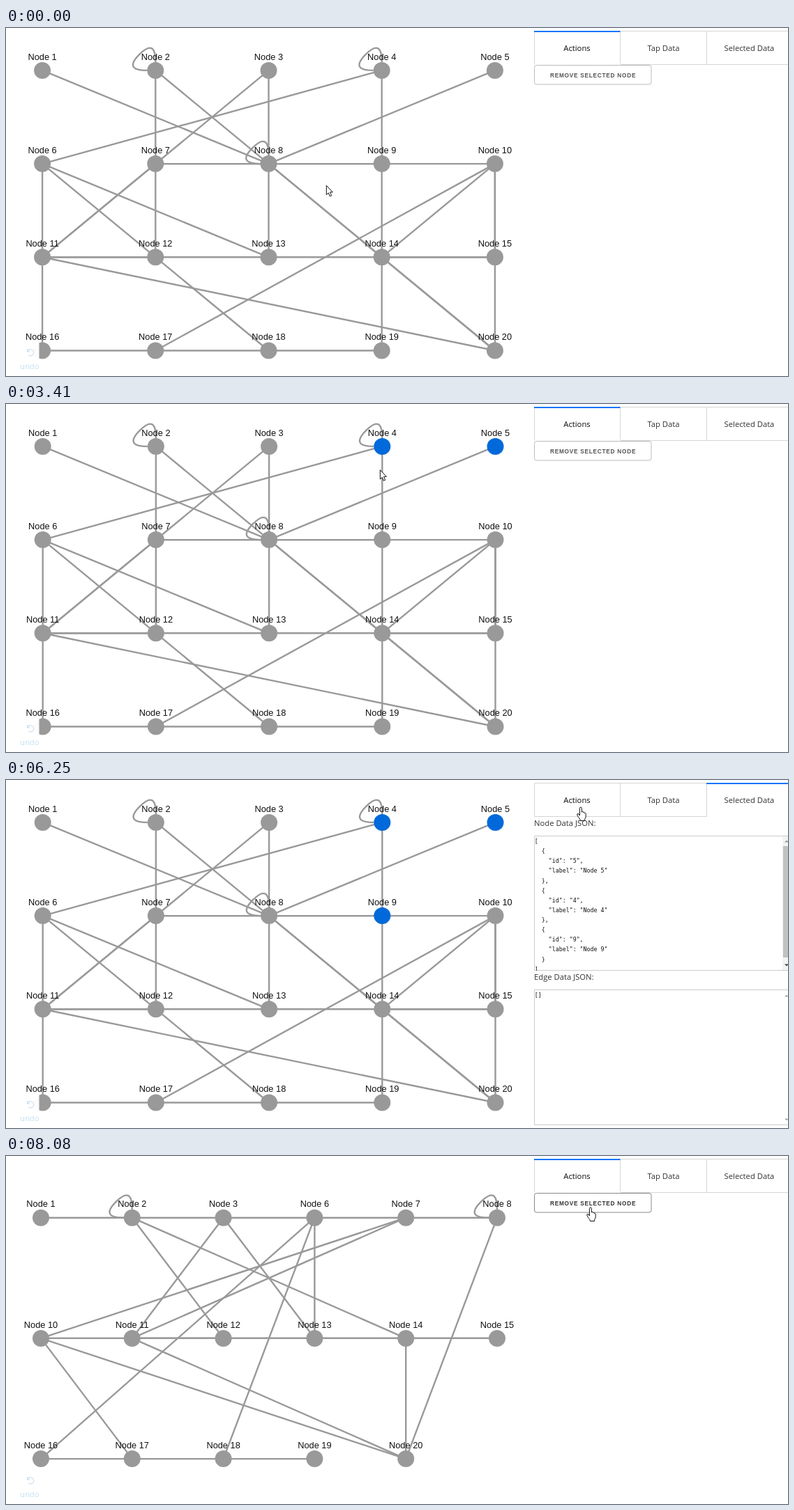
Recreate the animation shown at these times as an HTML page. Size 1121 by 500 pixels, loop 9110 ms.

```html
<!DOCTYPE html>
<html lang="en">
<head>
<meta charset="utf-8">
<title>Node graph</title>
<style>
html, body { margin: 0; width: 100%; height: 100%; overflow: hidden; background: #fff; }
svg { display: block; width: 1121px; height: 500px; }
.edge { fill: none; stroke: #999; stroke-width: 2.4; }
.label { font: 12.8px "Liberation Sans", Arial, sans-serif; text-anchor: middle; fill: #111; }
.ui { font: 11.25px "Open Sans", sans-serif; fill: #333; }
.mid { text-anchor: middle; }
.code { font: 8.3px "DejaVu Sans Mono", monospace; fill: #111; white-space: pre; }
.rule { fill: none; stroke: #d6d6d6; }
.button { font: bold 8.25px "Liberation Sans", Arial, sans-serif; letter-spacing: .75px; }
.cursor { fill: #fff; stroke: #111; stroke-width: 1; stroke-linejoin: round; }
</style>
</head>
<body>
<svg id="stage" viewBox="0 0 1121 500"></svg>
<script>
const LOOP = 9110;
const stage = document.getElementById('stage');

function add(parent, tag, attrs = {}, text) {
  const el = document.createElementNS('http://www.w3.org/2000/svg', tag);
  for (const key in attrs) el.setAttribute(key, attrs[key]);
  if (text !== undefined) el.textContent = text;
  parent.appendChild(el);
  return el;
}
const show = (el, on) => el.setAttribute('visibility', on ? 'inherit' : 'hidden');

const EDGES = ('1-8 2-12 2-14 3-11 3-13 4-6 4-19 5-8 6-13 6-16 6-18 7-9 7-10 7-11 8-20 ' +
  '10-14 10-15 10-17 10-20 11-12 11-15 11-20 14-15 14-20 16-19 2-2 4-4 8-8')
  .split(' ').map(pair => pair.split('-').map(Number));
const REMOVED = [4, 5, 9];
const ALL = Array.from({ length: 20 }, (_, i) => i + 1);
const KEPT = ALL.filter(id => !REMOVED.includes(id));

function edgePath([x, y], [u, v], isLoop) {
  if (!isLoop) return `M${x} ${y}L${u} ${v}`;
  const d = 46;
  return `M${x} ${y - 12}Q${x} ${y - d} ${x - d / 2} ${y - d / 2}Q${x - d} ${y} ${x - 12} ${y}`;
}

// Lays the given nodes out on a grid
function buildGraph(ids, cols, x0, y0, dx, dy) {
  const root = add(stage, 'g'), pos = {}, nodes = {}, doomed = [];
  ids.forEach((id, i) => pos[id] = [x0 + dx * (i % cols), y0 + dy * Math.floor(i / cols)]);
  for (const [a, b] of EDGES) {
    if (!pos[a] || !pos[b]) continue;
    const el = add(root, 'path', { class: 'edge', d: edgePath(pos[a], pos[b], a === b) });
    if (REMOVED.includes(a) || REMOVED.includes(b)) doomed.push(el);
  }
  for (const id of ids) {
    const [x, y] = pos[id];
    const g = add(root, 'g');
    nodes[id] = add(g, 'circle', { cx: x, cy: y, r: 12, fill: '#999' });
    add(g, 'text', { class: 'label', x, y: y - 15.4 }, 'Node ' + id);
    if (REMOVED.includes(id)) doomed.push(g);
  }
  return { root, pos, nodes, doomed };
}

const before = buildGraph(ALL, 5, 52.1, 60.9, 162.2, 134.2);
const after = buildGraph(KEPT, 6, 50, 88.7, 130.8, 173.2);
const press = add(before.root, 'rect', { width: 40.5, height: 40.5, rx: 4, fill: '#000', opacity: .25 });

// Undo control
add(stage, 'rect', { x: 20, y: 453, width: 27.5, height: 44, fill: '#fff', opacity: .97 });
add(stage, 'path', {
  d: 'M30.5 461v4h4M30.8 464.6A4.7 4.7 0 1 1 32.5 470.3', fill: 'none', stroke: '#c5dff0', 'stroke-width': 1.1
});
add(stage, 'text', { class: 'ui', x: 20, y: 490, style: 'fill:#c5dff0' }, 'undo');

// Side panel
add(stage, 'path', { class: 'rule', d: 'M1121 4.5H757.5V52.5H1121M880.5 4V52M1004.5 4V52' });
const TABS = [['Actions', 757, 818.5], ['Tap Data', 880, 942.5], ['Selected Data', 1004, 1065.5]];
const tabs = TABS.map(([name, x, mid]) => {
  const mark = add(stage, 'g');
  add(mark, 'rect', { x: x + 1, y: 51.5, width: 123, height: 2, fill: '#fff' });
  add(mark, 'rect', { x, y: 4, width: 123.5, height: 2, fill: '#1975fa' });
  const text = add(stage, 'text', { class: 'ui mid', x: mid, y: 32.5 }, name);
  return { mark, text };
});

const actions = add(stage, 'g');
const button = add(actions, 'rect', { x: 757.5, y: 53.5, width: 167.5, height: 27.5, rx: 3, fill: '#fff' });
const caption = add(actions, 'text', { class: 'button', x: 780, y: 71 }, 'REMOVE SELECTED NODE');

const data = add(stage, 'g');
const triangle = (x, y, h, fill) => add(data, 'path', { d: `M${x - 3} ${y + h}h6l-3 ${-2 * h}z`, fill });

function textArea(title, titleY, top, bottom, lines) {
  add(data, 'text', { class: 'ui', x: 757, y: titleY }, title);
  const clip = add(add(stage, 'clipPath', { id: 'clip' + top }), 'rect',
    { x: 757, y: top, width: 364, height: bottom - top });
  add(data, 'path', { class: 'rule', d: `M1121 ${top + .5}H757.5V${bottom - .5}H1121`, style: 'stroke:#ccc' });
  const body = add(data, 'g', { 'clip-path': `url(#clip${top})` });
  lines.forEach((line, i) =>
    add(body, 'text', { class: 'code', x: 757.7, y: top + 11 + i * 14.13 }, line));
}

const picked = [5, 4, 9].map(id => ({ id: String(id), label: 'Node ' + id }));
textArea('Node Data JSON:', 65.5, 80, 274, JSON.stringify(picked, null, 2).split('\n'));
textArea('Edge Data JSON:', 286.5, 301, 496, ['[]']);
add(data, 'rect', { x: 1113, y: 81, width: 8, height: 192, fill: '#f3f3f3' });
add(data, 'rect', { x: 1114, y: 95, width: 7, height: 160, fill: '#c1c1c1' });
triangle(1119, 88, 1.5, '#999');
triangle(1119, 266, -1.5, '#444');
triangle(1119, 310, 1.5, '#aaa');
triangle(1119, 488, -1.5, '#aaa');

// Pointer
const pointer = add(stage, 'g');
const arrow = add(pointer, 'path', {
  class: 'cursor', d: 'M.3 .3V13.6L3.2 10.9 5.3 15.8 7.6 14.8 5.5 9.9H9.4Z'
});
const hand = add(pointer, 'path', {
  class: 'cursor',
  d: 'M-1.6 12V1.6a1.5 1.5 0 0 1 3 0V7.2q.3-1.2 1.2-.9t1 1.4q.4-.9 1.2-.5t.8 1.5q.5-.7 1-.2t.6 1.6' +
     'V13q0 2-1 3.4t-.6 3.1H-.6q-.2-2-1.8-3.8T-5.2 11q-.3-1.5 1.1-1.6T-1.6 12z'
});

// Each leg: first step, last step, number of steps, target
const LEGS = [
  [150, 810, 6, 706, 63],
  [1930, 2740, 7, 535, 61],
  [3360, 3710, 3, 539, 190],
  [4440, 4880, 5, 1051, 40],
  [5450, 6250, 6, 824, 39],
  [7085, 7240, 2, 838, 74]
];

function pointerAt(t) {
  let x = 459, y = 226;
  for (const [start, end, n, tx, ty] of LEGS) {
    if (t < start) break;
    const step = Math.floor((t - start) / (end - start) * (n - 1) + 1e-6);
    const p = Math.min(1, (step + 1) / n);
    const e = p * p * (3 - 2 * p);
    x += (tx - x) * e;
    y += (ty - y) * e;
  }
  return [x, y];
}

const within = (t, a, b) => t >= a && t < b;
const PRESSES = [[5, 1220, 1370], [4, 3010, 3160], [9, 4210, 4330]];

function render(t) {
  const laidOut = t >= 8080;
  show(before.root, !laidOut);
  show(after.root, laidOut);
  const shifted = within(t, 1220, 1930) || t >= 3010;
  before.root.setAttribute('transform', `translate(${shifted ? .6 : 0} 0)`);
  before.doomed.forEach(el => show(el, t < 7950));

  let held = null;
  for (const [id, down, up] of PRESSES) {
    before.nodes[id].setAttribute('fill', t >= up ? '#0169d9' : '#999');
    if (within(t, down, up)) held = before.pos[id];
  }
  show(press, held);
  if (held) {
    press.setAttribute('x', held[0] - 20.25);
    press.setAttribute('y', held[1] - 20.25);
  }

  const selectedTab = within(t, 5310, 6930);
  const active = selectedTab ? 2 : 0;
  tabs.forEach(({ mark, text }, i) => {
    show(mark, i === active);
    text.style.fill = i === 0 ? '#0a0a0a' : '#333';
  });
  show(actions, !selectedTab);
  show(data, selectedTab);
  const hover = t >= 7240;
  button.setAttribute('stroke', hover ? '#888' : '#bbb');
  caption.setAttribute('fill', hover ? '#333' : '#555');

  const [x, y] = pointerAt(t);
  pointer.setAttribute('transform', `translate(${x} ${y})`);
  show(arrow, t < 4880);
  show(hand, t >= 4880);
}

const began = performance.now();
function tick() {
  render((performance.now() - began) % LOOP);
  requestAnimationFrame(tick);
}
tick();
</script>
</body>
</html>
```
